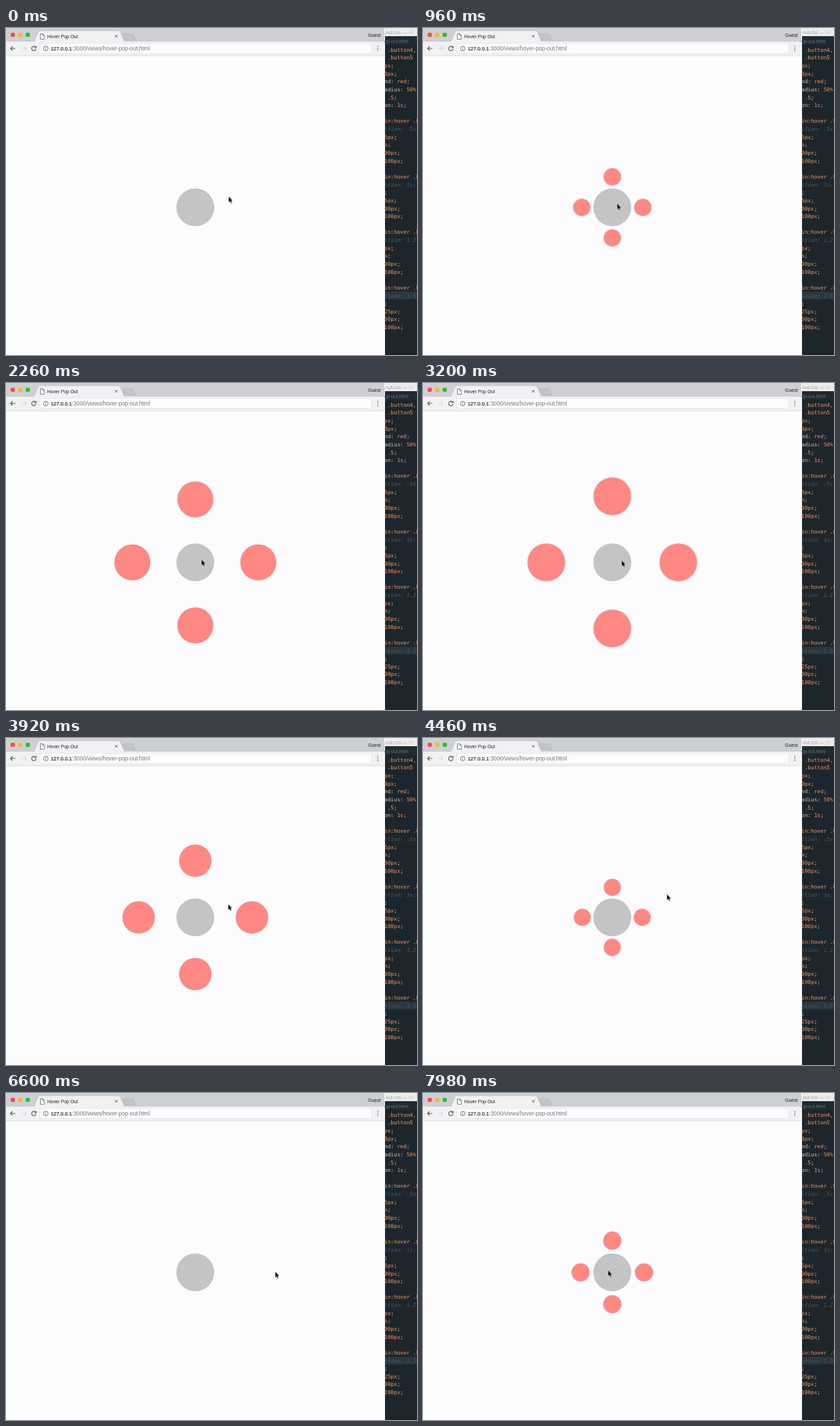
An HTML page for the animation above (8 s loop, 604 by 480 pixels).

```html
<!DOCTYPE html>
<html lang="en">
<head>
<meta charset="utf-8">
<title>Hover Pop Out</title>
<style>
  html, body { margin: 0; width: 100%; height: 100%; overflow: hidden; background: #fcfcff; }
  svg { display: block; width: 604px; height: 480px; }
  text { font-family: "Liberation Sans", Arial, sans-serif; white-space: pre; }
  #code text { font: 7.75px "DejaVu Sans Mono", monospace; fill: #c9c2bb; }
  #code .value { fill: #ea9460; }
  #code .selector { fill: #e89a68; }
  #code .comment { fill: #4a5a66; font-style: italic; }
  .line { fill: none; stroke: #555558; stroke-width: 1.1; }
</style>
</head>
<body>
<svg viewBox="0 0 604 480">
  <rect width="604" height="480" fill="#fcfcff"/>

  <g id="editor">
    <rect x="557" width="47" height="480" fill="#1d262c"/>
    <rect x="557" width="47" height="12" fill="#ececee"/>
    <rect x="557" y="12" width="47" height="13" fill="#202a31"/>
    <rect x="557" y="387" width="47" height="11.5" fill="#2b363d"/>
    <text x="556" y="8.5" font-size="7" fill="#a6a6aa">-out.css — ~/</text>
    <text x="556" y="22" font-size="7" fill="#66727b">op-out.html</text>
    <g id="code"></g>
  </g>

  <g id="browser">
    <rect width="556" height="21" fill="#cecfd2"/>
    <path d="M0 20H41L47 6Q48 4 50 4H165Q167 4 168 6L174 20H556V41H0Z" fill="#f1f1f3"/>
    <path d="M41 20L47 6Q48 4 50 4H165Q167 4 168 6L174 20" fill="none" stroke="#b8b8bc" stroke-width=".6"/>
    <path d="M171 8.5H185Q186.5 8.5 187 10L190 17.5H176Q174.5 17.5 174 16Z" fill="#c4c4c8" stroke="#b2b2b6" stroke-width=".6"/>
    <rect y="40.5" width="556" height=".8" fill="#d6d6d2"/>
    <circle cx="10" cy="10" r="3.3" fill="#fb4a48"/>
    <circle cx="21" cy="10" r="3.3" fill="#fdb62f"/>
    <circle cx="32" cy="10" r="3.3" fill="#28c038"/>
    <path class="line" d="M50.5 8.5H54L56.3 11V16.5H50.5ZM54 8.5V11H56.3" style="stroke-width:.7;fill:#fff"/>
    <text x="60.7" y="14.5" font-size="6.8" fill="#222224">Hover Pop Out</text>
    <path class="line" d="M160.3 10.3L164 14M164 10.3L160.3 14" style="stroke-width:.9"/>
    <text x="532" y="13" font-size="7" fill="#222224">Guest</text>
    <path class="line" d="M13.7 30H6.8M9.9 26.8L6.7 30L9.9 33.2"/>
    <path class="line" d="M23 30H29.5M26.5 26.8L29.7 30L26.5 33.2" style="stroke:#d9d9dc"/>
    <path class="line" d="M43.3 27.9A3.2 3.2 0 1 0 44 31M44.3 26.5V29H41.8"/>
    <rect x="50" y="22.8" width="487.5" height="14.7" rx="1.5" fill="#fcfcff" stroke="#dededf" stroke-width=".6"/>
    <circle class="line" cx="58.5" cy="30.2" r="3.4" style="stroke-width:.8"/>
    <path class="line" d="M58.5 29.8V32.2M58.5 28.2V29" style="stroke-width:.8"/>
    <text x="65.7" y="33" font-size="7.5" fill="#1c1c1e" stroke="#1c1c1e" stroke-width=".15">127.0.0.1</text>
    <text x="97" y="33" font-size="8.2" fill="#77777b">:3000/views/hover-pop-out.html</text>
    <path d="M546.4 27v.01M546.4 30v.01M546.4 33v.01" stroke="#4c4c50" stroke-width="1.5" stroke-linecap="round"/>
  </g>

  <g transform="translate(278.2 263.3)">
    <circle r="27.8" fill="#c4c4c6"/>
    <g id="buttons" fill="#ff1408" fill-opacity=".5">
      <circle cy="-97" r="27.8"/>
      <circle cx="97" r="27.8"/>
      <circle cy="97" r="27.8"/>
      <circle cx="-97" r="27.8"/>
    </g>
  </g>

  <g id="cursor">
    <path d="M0 0V8L1.8 6.4L3.2 9.6L4.5 9L3.1 6H5.4Z" fill="#050505" stroke="#f4f4f4" stroke-width=".8" paint-order="stroke"/>
  </g>
</svg>
<script>
const LOOP = 8000;
const byId = id => document.getElementById(id);

// A leading "/" marks a comment line.
const rule = (comment, ...values) => ['', 'in:hover .b', '/ition: ' + comment, ...values, '00px;', '100px;'];
const lines = [
  ' .button4,', ' .button5', 'px;', '0px;', 'nd: red;', 'adius: 50%', ' .5;', 'on: 1s;',
  ...rule('.5s', '5px;', '%;'),
  ...rule('1s;', ';', '5px;'),
  ...rule('1.2', 'px;', '%;'),
  ...rule('1.5', ';', '25px;')
];

function addSpan(parent, content, className) {
  const span = document.createElementNS(parent.namespaceURI, 'tspan');
  span.textContent = content;
  if (className) span.setAttribute('class', className);
  parent.append(span);
}

lines.forEach((line, i) => {
  const code = byId('code');
  const text = document.createElementNS(code.namespaceURI, 'text');
  text.setAttribute('x', 556);
  text.setAttribute('y', 34.7 + i * 11.64);
  if (line[0] === '/') addSpan(text, line.slice(1), 'comment');
  else if (/button|hover/.test(line)) addSpan(text, line, 'selector');
  else for (const part of line.split(/([\d.]+(?:px|s|%)?|^px|^%|red)/)) {
    if (part) addSpan(text, part, /^([\d.]|px|%|red)/.test(part) ? 'value' : '');
  }
  code.append(text);
});

// Hover transitions: start time, scale before and after.
const animations = [[178, 0, 1], [3557, 1, 0], [7172, 0, 1]].map(([delay, from, to], i) =>
  byId('buttons').animate(
    [{ transform: `scale(${from})` }, { transform: `scale(${to})` }],
    { delay, duration: 2850, easing: 'ease', fill: i ? 'forwards' : 'both' }
  ));

// Pointer path: time, x, y.
const path = [
  [0, 327.5, 247.5], [178, 306, 252], [700, 286, 257.5], [1560, 284, 258.5],
  [3200, 292, 260.5], [3557, 305, 254], [4460, 358.5, 229.5], [5200, 424, 216],
  [5580, 429, 215.5], [6000, 425, 228], [6600, 396, 262.5], [7172, 306, 262],
  [7600, 276, 261], [7980, 272.3, 260.5], [LOOP, 272.3, 260.5]
];
animations.push(byId('cursor').animate(
  path.map(([time, x, y]) => ({ offset: time / LOOP, transform: `translate(${x}px, ${y}px)` })),
  { duration: LOOP, fill: 'both' }
));
animations.forEach(animation => animation.pause());

const start = performance.now();
function draw() {
  const time = (performance.now() - start) % LOOP;
  for (const animation of animations) animation.currentTime = time;
  requestAnimationFrame(draw);
}
draw();
</script>
</body>
</html>
```
